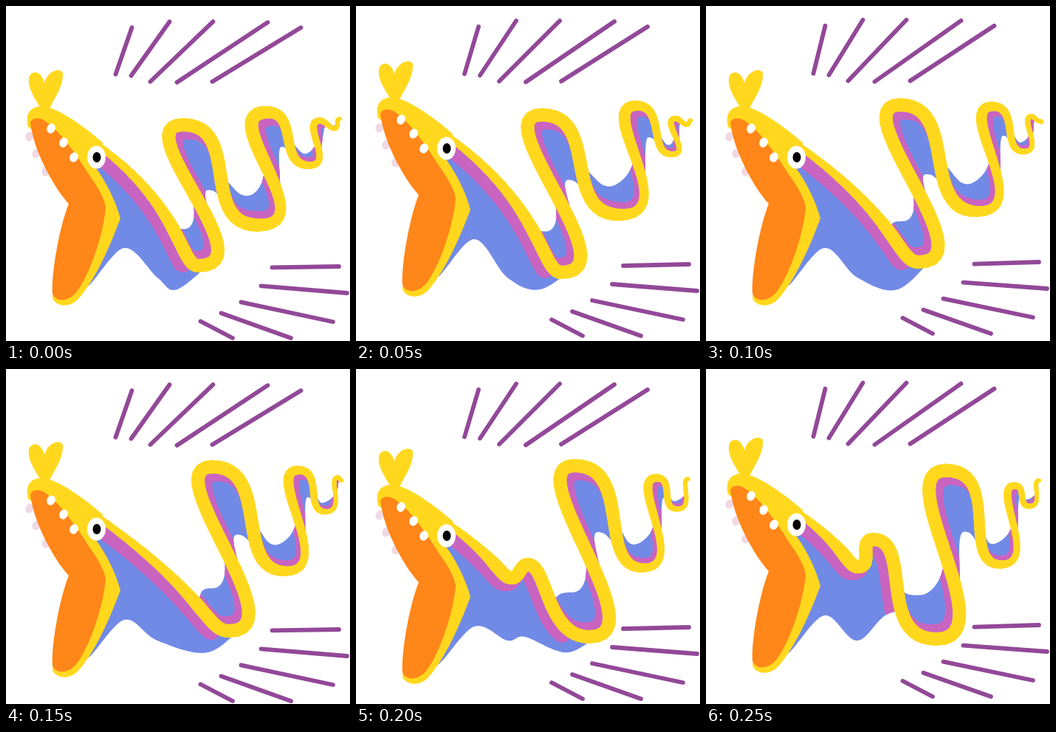
Write an HTML page with a canvas that moves like this. It is 466 px wide and 454 px high and loops after 0.3 s.

```html
<!DOCTYPE html>
<html lang="en">
<head>
<meta charset="utf-8">
<title>Eel</title>
<style>
html, body { margin: 0; width: 100%; height: 100%; overflow: hidden; background: #fff; }
canvas { display: block; width: 466px; height: 454px; }
</style>
</head>
<body>
<canvas id="c" width="466" height="454"></canvas>
<script>
const ctx = document.getElementById('c').getContext('2d');
const YELLOW = '#ffd81e', ORANGE = '#ff8618', BLUE = '#718ae6', PINK = '#c964c0', VIOLET = '#924898';
const STEP = 50, CYCLE = 6;
const HEAD_Y = [0, -12, 0, 12, 21, 6];

// Waves run along the body, one wavelength per loop. Keys: [age in steps, x, y].
const CREST = [[4, 233, 265], [5, 227, 231], [6, 240, 161], [8, 263, 134], [10, 296, 131], [12, 354, 144],
  [13, 380, 135], [15, 396, 137], [17, 418, 158], [21, 449, 147], [26, 455, 157]];
const TROUGH = [[4, 211, 283], [5, 206, 268], [6, 260, 352], [7, 278, 361], [8, 288, 347], [10, 316, 363],
  [11, 312, 366], [12, 342, 297], [13, 358, 283], [17, 399, 265], [18, 411, 216], [19, 428, 201],
  [23, 438, 186], [24, 445, 166], [27, 455, 151]];

// Rays as tip and base
const RAYS = [
  [166, 28, 147, 92], [217, 20, 168, 94], [276, 20, 194, 102], [350, 21, 230, 103], [395, 28, 278, 102],
  [451, 350, 362, 352], [462, 386, 347, 377], [443, 425, 320, 399], [386, 447, 293, 414], [307, 447, 265, 425]];

const mix = (a, b, u) => a + (b - a) * u;
const pt = (x, y) => ({ x, y });
const body = x => Math.min(18, 18 - (x - 345) * 0.118);

function bezier([a, b, c, d], u) {
  const v = 1 - u, f = k => v * v * v * a[k] + 3 * v * v * u * b[k] + 3 * v * u * u * c[k] + u * u * u * d[k];
  return pt(f('x'), f('y'));
}

const sample = (f, from, to) => {
  const n = Math.ceil(Math.abs(to - from) * 24);
  return Array.from({ length: n + 1 }, (_, i) => f(mix(from, to, i / n)));
};

const curve = (...p) => sample(u => bezier(p, u), 0, 1);

// Smooth line through points
function spline(p) {
  const get = i => p[Math.max(0, Math.min(p.length - 1, i))];
  const lean = (a, b, c) => pt(a.x + (c.x - b.x) / 6, a.y + (c.y - b.y) / 6);
  return p.slice(1).flatMap((b, i) =>
    curve(p[i], lean(p[i], get(i - 1), b), lean(b, get(i + 2), p[i]), b));
}

function wave(keys, age, side) {
  let i = 1;
  while (i < keys.length - 1 && keys[i][0] < age) i++;
  const [a, b] = [keys[i - 1], keys[i]], u = (age - a[0]) / (b[0] - a[0]);
  const x = mix(a[1], b[1], u);
  const reach = Math.min(80, (470 - x) * 0.65) * (side < 0 ? 1.2 : 1) * Math.min(1, (age - 3) / 3);
  return { x, y: mix(a[2], b[2], u), reach, side, age };
}

function makeKnots(k) {
  const knots = [pt(118, 184 + HEAD_Y[k])];
  for (let age = k < 4 ? k + CYCLE : k; age <= 27; age += CYCLE) {
    knots.push(wave(TROUGH, age, -1));
    if (age <= 26) knots.push(wave(CREST, age, 1));
  }
  return knots;
}

function makeRidge(knots) {
  const arms = knots.slice(1).map((b, i) => {
    const a = knots[i];
    if (i === 0) {
      const dx = b.x - a.x;
      return [a, pt(a.x + dx * 0.85, a.y + dx * 0.6), pt(b.x - dx * 0.17, b.y), b];
    }
    const cap = Math.abs(b.y - a.y) * 0.6;
    return [a, pt(a.x + Math.min(a.reach, cap), a.y), pt(b.x - Math.min(b.reach, cap), b.y), b];
  });
  return t => {
    const i = Math.min(arms.length - 1, Math.floor(t));
    return bezier(arms[i], t - i);
  };
}

function path(pts) {
  ctx.beginPath();
  pts.forEach(p => ctx.lineTo(p.x, p.y));
}

// Line whose width follows the body; sx and sy shift it in body widths
function ribbon(pts, color, size, sx = 0, sy = 0) {
  ctx.strokeStyle = color;
  pts.slice(1).forEach((b, i) => {
    const w = body(b.x);
    ctx.lineWidth = w * size(i / pts.length);
    path([pts[i], b].map(p => pt(p.x + sx * w, p.y + sy * w)));
    ctx.stroke();
  });
}

// Blue area with a pink rim along the ridge
function flesh(outline, rim, sx, sy) {
  ctx.save();
  path(outline);
  ctx.fillStyle = BLUE;
  ctx.fill();
  ctx.clip();
  ribbon(rim, PINK, () => 1.45, sx, sy);
  ctx.restore();
}

function drawBelly(knots, ridge, dy) {
  const main = knots[1].age < CYCLE ? 3 : 1, t = knots[main];
  let low = pt(t.x - 28, 384);
  const under = [];
  if (main > 1) {
    const hump = knots[2], grown = hump.age - 4;
    const dip = pt(hump.x + mix(-4, 28, grown), hump.y + 98);
    low = pt(mix(low.x, dip.x, grown), mix(low.y, dip.y, grown));
    if (!grown) under.push(dip);
  }
  const end = main + 0.15;
  const edge = spline([ridge(end), low, ...under, pt(205, 368), pt(160, 328 + dy), pt(108, 380 + dy), pt(120, 300 + dy)]);
  flesh([...sample(ridge, 0, end), ...edge], sample(ridge, 0, main - 0.2), -0.45, 0.28);
  return main;
}

function drawBend(knots, ridge, i) {
  const k = knots[i], next = knots[i + 1], h = Math.abs(next.y - k.y), hump = k.side > 0;
  const from = i - (hump ? 0.72 : 0.5), to = i + (hump ? 0.75 : 0.6);
  const a = ridge(from), b = ridge(to);
  const notch = hump ? pt(mix(k.x, next.x, 0.34), mix(k.y, next.y, 0.65)) : pt(k.x - h * 0.1, k.y - h * 0.26);
  const soft = h * 0.1;
  const edge = [
    ...curve(b, pt(b.x + (hump ? -soft : soft), mix(b.y, notch.y, 0.5)), pt(notch.x + soft, notch.y), notch),
    ...curve(notch, pt(notch.x - soft, notch.y), pt(mix(notch.x, a.x, 0.5), mix(notch.y, a.y, 0.5)), a)];
  flesh([...sample(ridge, from, to), ...edge], sample(ridge, i - 0.8, Math.min(i + 0.8, knots.length - 1)),
    k.side * 0.33, k.side * 0.36);
}

function drawRays(k) {
  const s = 1 - k % 3;
  ctx.strokeStyle = VIOLET;
  ctx.lineWidth = 5.8;
  RAYS.forEach(([x, y, bx, by], i) => {
    const top = i < 5;
    path([pt(x + (top ? 4.5 * s : 0), y + (top ? 1.2 : 3) * s),
      pt(bx + (top ? 1.5 : -1.5) * s, by + (top ? 0.5 : 2.3) * s)]);
    ctx.stroke();
  });
}

function shape(d, color) {
  ctx.fillStyle = color;
  ctx.fill(new Path2D(d));
}

function oval(x, y, rx, ry, color, turn = 0) {
  ctx.beginPath();
  ctx.ellipse(x, y, rx, ry, turn, 0, Math.PI * 2);
  ctx.fillStyle = color;
  ctx.fill();
}

function drawHead(dy) {
  ctx.save();
  ctx.translate(0, dy);
  [[32, 177], [41, 200], [54, 224]].forEach(([x, y]) => oval(x, y, 5.5, 6.5, '#f0d9e4', 0.4));
  shape('M48 140C38 124 29 110 31 98C33 87 47 86 52 104C57 87 74 83 77 91C78 109 66 124 58 141Z', YELLOW);
  shape('M30 164C25 145 34 134 54 136C80 144 106 164 131 185L130 205L122 220' +
    'C137 240 150 268 155 288C141 325 121 372 97 398C86 409 68 408 63 396L64 385L86 270L60 225L36 168Z', YELLOW);
  shape('M33 158C36 150 48 151 56 158C75 172 98 205 112 228C125 246 134 262 135 273' +
    'C132 310 113 365 96 387C85 401 68 402 63 390C61 365 72 300 85 268C68 250 38 200 33 158Z', ORANGE);
  [[61, 166], [78, 185], [92, 205]].forEach(([x, y]) => oval(x, y, 5.6, 6.8, '#fff', 0.4));
  oval(122.5, 205, 12.5, 15.5, '#fff');
  oval(123, 205, 5.5, 7, '#000');
  ctx.restore();
}

function draw(ms) {
  const k = Math.floor(ms / STEP) % CYCLE, dy = HEAD_Y[k];
  const knots = makeKnots(k), ridge = makeRidge(knots), last = knots.length - 1;
  ctx.fillStyle = '#fff';
  ctx.fillRect(0, 0, 466, 454);
  ctx.lineCap = 'round';
  drawRays(k);
  const main = drawBelly(knots, ridge, dy);
  for (let i = main; i < last; i++) drawBend(knots, ridge, i);
  ribbon(sample(ridge, 0, last), YELLOW, u => Math.min(1, 0.5 + u * last));
  drawHead(dy);
}

const start = performance.now();
function tick() {
  draw(performance.now() - start);
  requestAnimationFrame(tick);
}
tick();
</script>
</body>
</html>
```
